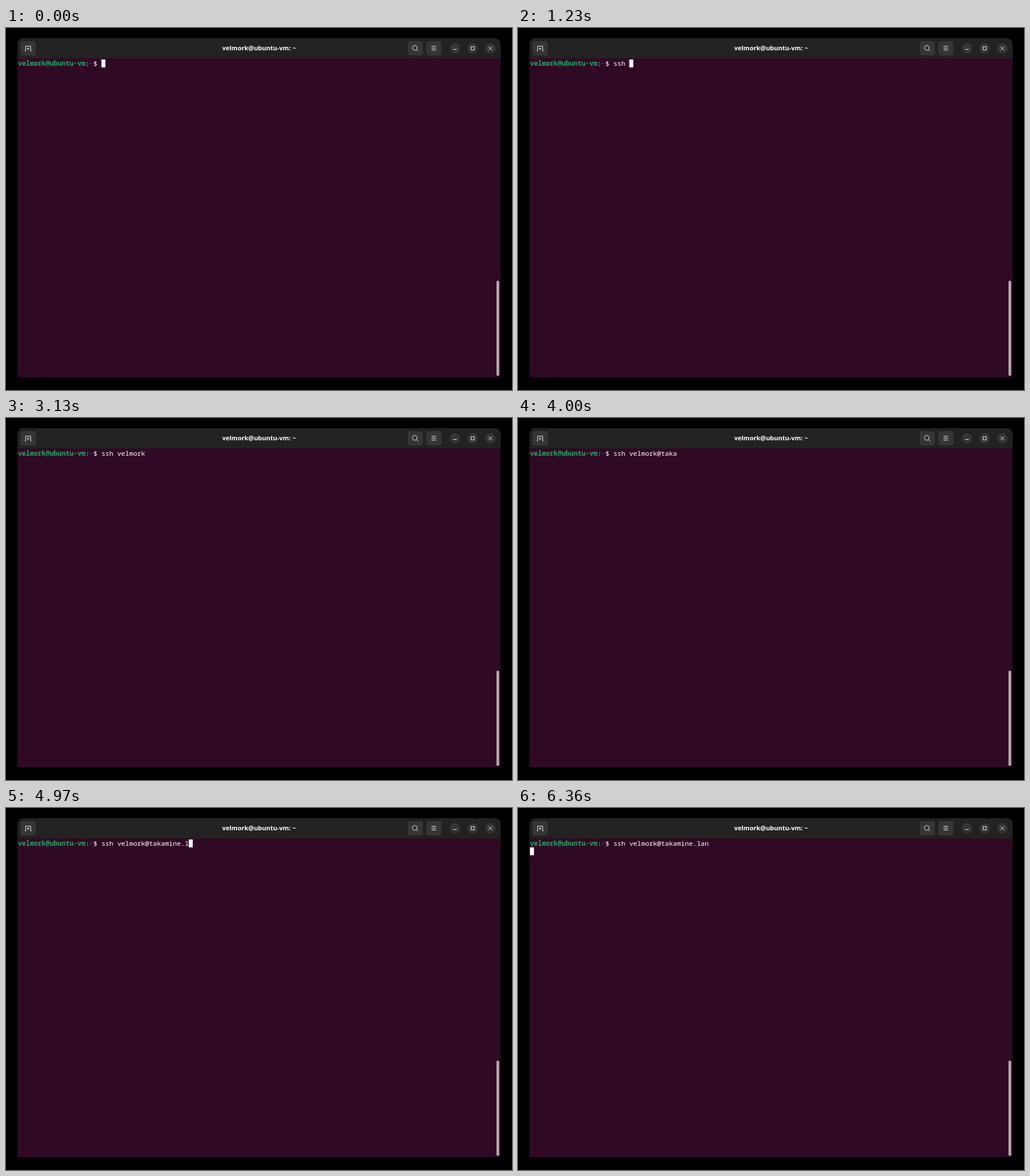
These frames come from a looping animation (884x633 px, 8000 ms). An HTML page with a canvas:

```html
<!DOCTYPE html>
<html lang="en">
<head>
<meta charset="utf-8">
<title>Terminal</title>
<style>
html, body { margin: 0; width: 100%; height: 100%; overflow: hidden; background: #000; }
canvas { display: block; }
</style>
</head>
<body>
<canvas id="stage" width="884" height="633"></canvas>
<script>
const ctx = document.getElementById('stage').getContext('2d');
const LOOP = 8000;
const USER = 'velmork', HOST = 'ubuntu-vm';

// Each burst is typed at an even pace between its first and last key.
const BURSTS = [
  { text: 'ssh ', from: 670, to: 1230 },
  { text: USER, from: 2580, to: 3130 },
  { text: '@', from: 3360, to: 3360 },
  { text: 'taka', from: 3680, to: 4000 },
  { text: 'mine', from: 4250, to: 4550 },
  { text: '.lan', from: 4770, to: 5190 }
];
const ENTER = 6360, CURSOR_OFF = 2900, CURSOR_ON = 4250;

const GRID = { x: 20.9, y: 55, w: 6.94, h: 13.8, baseline: 66 };
const WHITE = '#ffffff', ICON = '#f2f2f2', BUTTON = '#353535';
const MIDDLE = 35.5;

function typedText(t) {
  return BURSTS.map(({ text, from, to }) => {
    if (t < from) return '';
    if (t >= to) return text;
    const pace = (to - from) / (text.length - 1);
    return text.slice(0, 1 + Math.floor((t - from) / pace));
  }).join('');
}

function box(x, y, w, h, radius, fill) {
  ctx.beginPath();
  ctx.roundRect(x, y, w, h, radius);
  ctx.fillStyle = fill;
  ctx.fill();
}

function circle(x, y, r) {
  ctx.beginPath();
  ctx.arc(x, y, r, 0, Math.PI * 2);
}

function line(x1, y1, x2, y2) {
  ctx.beginPath();
  ctx.moveTo(x1, y1);
  ctx.lineTo(x2, y2);
  ctx.stroke();
}

// Icons are drawn around their own centre.
const icons = {
  newTab() {
    ctx.beginPath();
    ctx.moveTo(-5.8, 4.7);
    ctx.lineTo(-4.4, 4.7);
    ctx.lineTo(-4.4, -3.7);
    ctx.lineTo(4.4, -3.7);
    ctx.lineTo(4.4, 4.7);
    ctx.lineTo(5.8, 4.7);
    ctx.stroke();
    line(-2, 0.7, 2, 0.7);
    line(0, -1.3, 0, 2.7);
  },
  search() {
    circle(-0.9, -0.8, 4.2);
    ctx.stroke();
    line(2.1, 2.2, 5, 5);
  },
  menu() {
    for (const y of [-3.2, 0, 3.2]) line(-4, y - 0.2, 4, y - 0.2);
  },
  minimise() { line(-3.2, 2, 3.2, 2); },
  maximise() { ctx.strokeRect(-2.8, -2.8, 5.6, 5.6); },
  close() {
    for (const s of [-1, 1]) line(-3.2, -3.2 * s, 3.2, 3.2 * s);
  }
};

function drawButton(name, x, round) {
  if (round) {
    circle(x, MIDDLE, 9.2);
    ctx.fillStyle = BUTTON;
    ctx.fill();
  } else {
    box(x - 13.3, MIDDLE - 12.5, 26.6, 25, 4.5, BUTTON);
  }
  ctx.save();
  ctx.translate(x, MIDDLE);
  ctx.strokeStyle = ICON;
  ctx.lineWidth = 1;
  icons[name]();
  ctx.restore();
}

function drawHeader() {
  box(20, 17.7, 844, 35.3, [10, 10, 0, 0], '#222222');
  ctx.font = 'bold 11px "Noto Sans", sans-serif';
  ctx.textAlign = 'center';
  ctx.fillStyle = WHITE;
  ctx.fillText(`${USER}@${HOST}: ~`, 442.2, 39);

  drawButton('newTab', 38.7);
  drawButton('search', 715);
  drawButton('menu', 747.4);
  ['minimise', 'maximise', 'close'].forEach((name, i) =>
    drawButton(name, 784.4 + i * 30.9, true));
}

function gridText(text, col, color, weight = 'normal') {
  ctx.font = `${weight} 11.58px "Noto Sans Mono", monospace`;
  ctx.textAlign = 'left';
  ctx.fillStyle = color;
  [...text].forEach((ch, i) =>
    ctx.fillText(ch, GRID.x + (col + i) * GRID.w, GRID.baseline));
  return col + text.length;
}

function drawPrompt() {
  let col = gridText(`${USER}@${HOST}`, 0, '#26a269', 'bold');
  col = gridText(':', col, WHITE);
  col = gridText('~', col, '#1a56a0', 'bold');
  return gridText('$ ', col, WHITE);
}

function drawCursor(col, row) {
  ctx.fillStyle = WHITE;
  ctx.fillRect(GRID.x + col * GRID.w, GRID.y + row * GRID.h, GRID.w, GRID.h);
}

function draw(t) {
  ctx.fillStyle = '#000';
  ctx.fillRect(0, 0, 884, 633);
  ctx.fillStyle = '#300a24';
  ctx.fillRect(20, 53, 844, 557.6);
  drawHeader();
  box(856.9, 441.7, 4.7, 166.6, 2.3, '#b2abaf');

  const end = gridText(typedText(t), drawPrompt(), WHITE);
  if (t >= ENTER) drawCursor(0, 1);
  else if (t < CURSOR_OFF || t >= CURSOR_ON) drawCursor(end, 0);
}

const began = performance.now();
function tick() {
  draw((performance.now() - began) % LOOP);
  requestAnimationFrame(tick);
}
tick();
</script>
</body>
</html>
```
